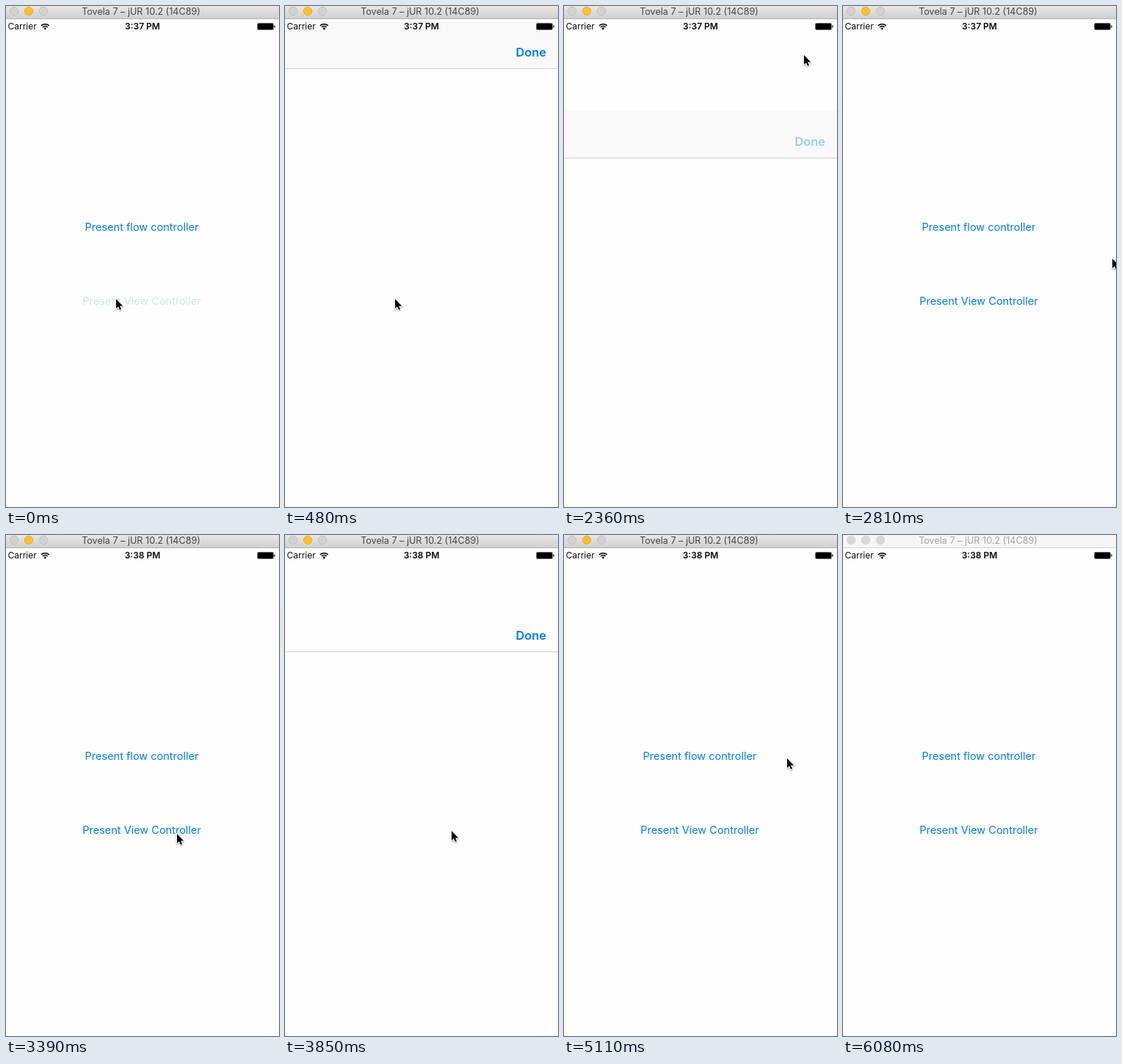
An HTML page with a canvas for the animation above (6.18 s loop, 372x684 px).

```html
<!DOCTYPE html>
<html lang="en">
<head>
<meta charset="utf-8">
<title>Modal presentation</title>
<style>
  html, body { margin: 0; width: 100%; height: 100%; overflow: hidden; background: #fefefe; }
  #stage { position: relative; width: 372px; height: 684px; overflow: hidden;
    background: #fefefe; font-family: Inter, Roboto, sans-serif; }
  #stage > *, #modal > * { position: absolute; white-space: pre; line-height: 20px; }
  .link { left: 0; width: 370px; text-align: center; color: #007aff; font-size: 14.5px; }
  #flow { top: 292px; }
  #view { top: 393px; }
  #modal { left: 0; top: 18px; width: 372px; height: 666px; background: #fefefe; }
  #nav { left: 0; top: 0; width: 372px; height: 64px; border-bottom: 1px solid #d2d2d2; }
  #done { right: 16px; top: 32px; color: #007aff; font-size: 16.4px; font-weight: 600; }
  .status { top: 18px; color: #0a0a0a; font-size: 12px; }
  #carrier { left: 2.5px; }
  #clock { left: 0; width: 372px; text-align: center; font-weight: 600; }
  #stage > #title { left: 0; top: 0; width: 368px; height: 17px; padding-right: 4px;
    text-align: center; line-height: 15px; font-size: 12.6px; color: #444;
    background: linear-gradient(#e7e7e7, #d0d0d0); border-bottom: 1px solid #b4b4b4; }
  #stage > #title.idle { color: #a6a6a6; background: #f6f6f6; border-color: #d4d4d4; }
  canvas { left: 0; top: 0; }
</style>
</head>
<body>
<div id="stage">
  <span class="link" id="flow">Present flow controller</span>
  <span class="link" id="view">Present View Controller</span>
  <div id="modal"><div id="nav"></div><span id="done">Done</span></div>
  <span class="status" id="carrier">Carrier</span>
  <span class="status" id="clock">3:37 PM</span>
  <div id="title">Tovela 7 – jUR 10.2 (14C89)</div>
  <canvas id="art" width="372" height="684"></canvas>
</div>
<script>
const LOOP = 6180, TRAVEL = 666, LEAD = 67, FADE = 250;
const $ = id => document.getElementById(id);
const view = $('view'), modal = $('modal'), nav = $('nav'), done = $('done');
const clock = $('clock'), title = $('title'), ctx = $('art').getContext('2d');

// Link pressed, sheet shown, spring rate, Done pressed, sheet dismissed
const visits = [
  { tap: 0, show: 60, rate: .0155, press: 2240, hide: 2310, bar: '#f9f9f9' },
  { tap: 3560, show: 3740, rate: .0208, press: 4590, hide: 4650, bar: '#fdfdfd' }
];

const home = { x: 150, y: 400 };
const moves = [
  { from: 840, to: 1070, x: 203, y: 339 },   // pause on the sheet
  { from: 1260, to: 1830, x: 327, y: 67 },   // Done
  { from: 2500, to: 2810, x: 367, y: 343 },  // right edge
  { from: 2810, to: 2990, x: 357, y: 487 },
  { from: 3120, to: 3500, x: 227, y: 404 },  // second link
  { from: 4060, to: 4593, x: 330, y: 61 },   // Done
  { from: 4890, to: 5110, x: 303, y: 300 },  // down and out
  { from: 5110, to: 5280, x: 341, y: 649 },
  { from: 5470, to: 5690, x: 344, y: 690 }
];

const clamp = v => Math.max(0, Math.min(1, v));
const lerp = (a, b, k) => a + (b - a) * k;
const easeOut = k => 1 - (1 - k) ** 2.4;
// Remaining part of a critically damped move
const settle = x => x <= 0 ? 1 : (1 + x) * Math.exp(-x);

function sheetOffset(v, t) {
  if (t < v.show) return TRAVEL;
  if (t < v.hide) return TRAVEL * settle(v.rate * (t - v.show + LEAD));
  return TRAVEL * (1 - settle(.0155 * (t - v.hide)));
}

// Dimmed while held, then fading back
function pressAlpha(t, down, up) {
  return t < down ? 1 : lerp(.2, 1, clamp((t - up) / FADE));
}

function pointerAt(t) {
  let { x, y } = home;
  for (const m of moves) {
    const k = easeOut(clamp((t - m.from) / (m.to - m.from)));
    x = lerp(x, m.x, k);
    y = lerp(y, m.y, k);
  }
  return [x, y];
}

function drawLights(idle) {
  for (let i = 0; i < 3; i++) {
    const lit = i === 1 && !idle;
    ctx.beginPath();
    ctx.arc(11 + 20 * i, 7, 5.7, 0, 7);
    ctx.fillStyle = lit ? '#fdbe30' : idle ? '#d8d8d8' : '#d2d2d2';
    ctx.strokeStyle = lit ? '#e2a42a' : idle ? '#cfcfcf' : '#bababa';
    ctx.lineWidth = .8;
    ctx.fill();
    ctx.stroke();
  }
}

function drawWifi(x, y) {
  const from = -Math.PI * .75, to = -Math.PI * .25;
  ctx.strokeStyle = ctx.fillStyle = '#000';
  ctx.lineWidth = 1.6;
  for (const r of [4.7, 7.6]) {
    ctx.beginPath();
    ctx.arc(x, y, r, from, to);
    ctx.stroke();
  }
  ctx.beginPath();
  ctx.moveTo(x, y + .5);
  ctx.arc(x, y, 2.6, from, to);
  ctx.fill();
}

function drawBattery(x, y) {
  ctx.strokeStyle = '#777';
  ctx.fillStyle = '#000';
  ctx.lineWidth = 1;
  ctx.beginPath();
  ctx.roundRect(x + .5, y + .5, 22, 9, 1.8);
  ctx.stroke();
  ctx.fillRect(x + 1, y + 1, 21, 8);
  ctx.fillRect(x + 23.4, y + 3.5, 1.2, 3);
}

const arrow = new Path2D('M0 0V13L3 10.2 4.9 14.8 7 13.9 5.1 9.4H9.2Z');

function drawPointer([x, y]) {
  ctx.save();
  ctx.translate(Math.round(x), Math.round(y));
  ctx.lineJoin = 'round';
  ctx.lineWidth = 2;
  ctx.strokeStyle = '#fff';
  ctx.shadowColor = 'rgba(0,0,0,.4)';
  ctx.shadowBlur = 2;
  ctx.shadowOffsetY = 1;
  ctx.stroke(arrow);
  ctx.shadowColor = 'transparent';
  ctx.fillStyle = '#000';
  ctx.fill(arrow);
  ctx.restore();
}

function render(t) {
  const visit = visits[t < visits[1].tap ? 0 : 1];
  const idle = t >= 6080;
  view.style.opacity = pressAlpha(t, visit.tap, visit.show);
  modal.style.transform = `translateY(${Math.round(sheetOffset(visit, t))}px)`;
  nav.style.background = visit.bar;
  done.style.opacity = pressAlpha(t, visit.press, visit.hide);
  clock.textContent = t < 3380 ? '3:37 PM' : '3:38 PM';
  title.className = idle ? 'idle' : '';

  ctx.clearRect(0, 0, 372, 684);
  drawLights(idle);
  drawWifi(53.3, 32.3);
  drawBattery(342, 23);
  drawPointer(pointerAt(t));
}

const start = performance.now();
function tick() {
  render((performance.now() - start) % LOOP);
  requestAnimationFrame(tick);
}
tick();
</script>
</body>
</html>
```
